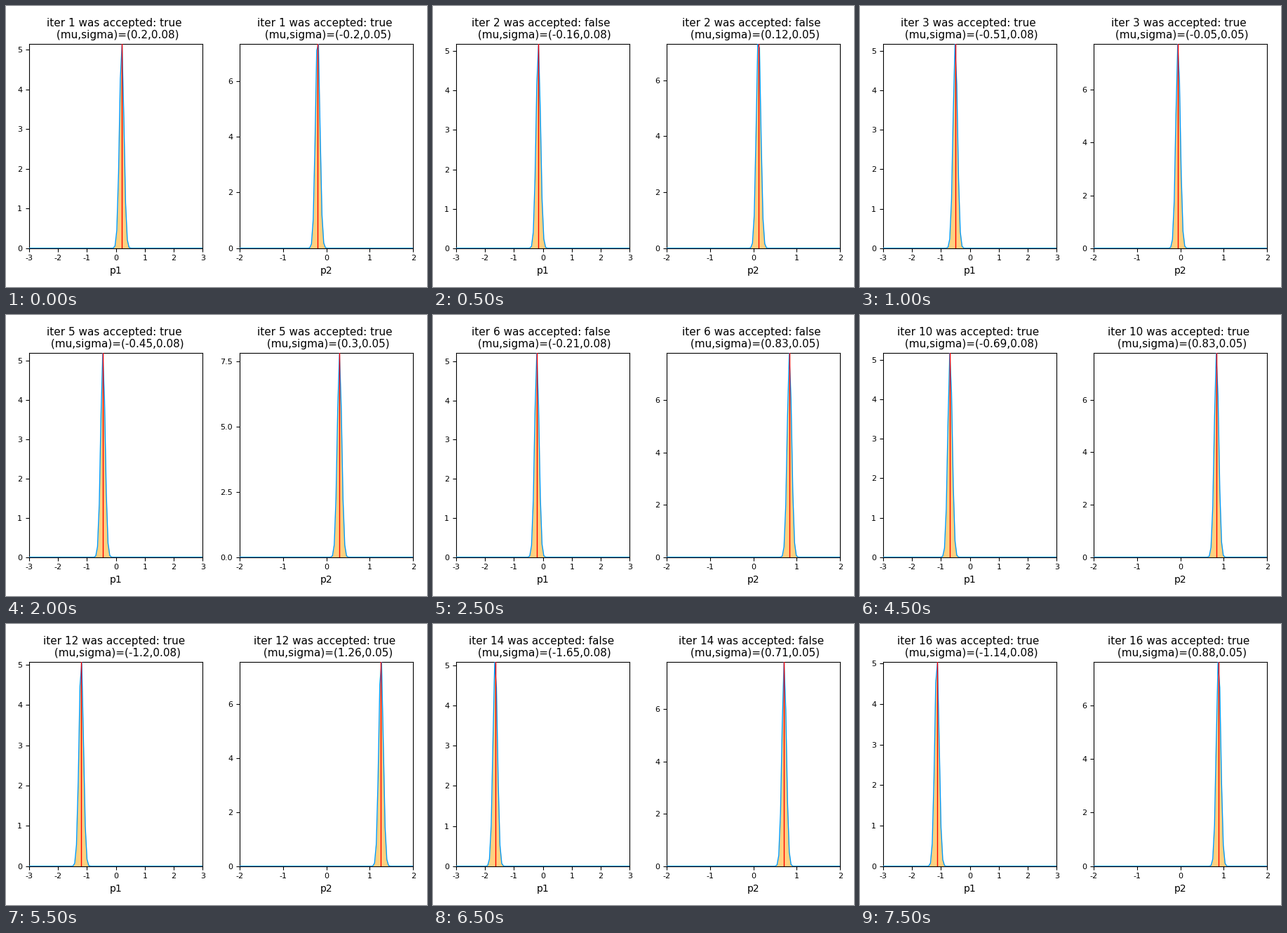
Recreate the animation shown at these times as a matplotlib script. Size 600 by 400 pixels, loop 8000 ms.

```python
import numpy as np
import matplotlib.pyplot as plt
from matplotlib.animation import FuncAnimation

W, H, DPI = 600, 400, 100
plt.rcParams["font.family"] = "DejaVu Sans"

BLUE, ORANGE, RED = "#009afa", "#ffa500", "#ff0000"

# One step of the chain: mean of p1, mean of p2, accepted
STEPS = [
    (0.2, -0.2, True), (-0.16, 0.12, False), (-0.506, -0.0534, True),
    (-0.38, 0.24, True), (-0.45, 0.303, True), (-0.2105, 0.832, False),
    (-0.33, 0.64, False), (-0.3532, 1.0792, False), (-0.56, 1.306, False),
    (-0.6876, 0.833, True), (-0.97, 1.838, True), (-1.2, 1.26, True),
    (-1.37, 0.58, False), (-1.6495, 0.71, False), (-1.36, 1.18, True),
    (-1.141, 0.8802, True),
]

fig = plt.figure(figsize=(W / DPI, H / DPI), dpi=DPI, facecolor="white")


def make_axes(left):
    return fig.add_axes([left / W, 55.25 / H, 247.3 / W, 290.5 / H])


# axes, label, half-width of the x range, sigma
PANELS = [
    (make_axes(33.0), "p1", 3, 0.0766),
    (make_axes(332.9), "p2", 2, 0.0511),
]


def y_ticks(top):
    if top < 6:
        return np.arange(6), "{:.0f}"
    if top < 7.8:
        return np.arange(0, 7, 2), "{:.0f}"
    return np.arange(0, 7.6, 2.5), "{:.1f}"


def draw_panel(panel, mu, head):
    ax, name, half, sigma = panel
    ax.clear()
    x = np.linspace(-half, half, 100)
    y = np.exp(-0.5 * ((x - mu) / sigma) ** 2) / (sigma * np.sqrt(2 * np.pi))
    top = y.max()
    ax.set_xlim(-half, half)
    ax.set_ylim(0, top)

    ax.fill_between(x, y, color=ORANGE, alpha=0.5, linewidth=0, zorder=1)
    ax.plot(x, y, color=BLUE, linewidth=1, zorder=4)
    ax.plot([mu, mu], [0, top], color=RED, linewidth=1, zorder=5)

    xt = range(-half, half + 1)
    ax.set_xticks(xt, [str(t) for t in xt])
    yt, fmt = y_ticks(top)
    yt = yt[yt <= top]
    ax.set_yticks(yt, [fmt.format(t) for t in yt])
    ax.tick_params(labelsize=8)
    ax.set_xlabel(name, fontsize=10)
    params = f"(mu,sigma)=({round(mu, 2)},{round(sigma, 2)})"
    ax.set_title(f"{head} \n {params}", fontsize=11)


def update(i):
    *means, accepted = STEPS[i]
    head = f"iter {i + 1} was accepted: {str(accepted).lower()}"
    for panel, mu in zip(PANELS, means):
        draw_panel(panel, mu, head)
    return []


anim = FuncAnimation(fig, update, frames=len(STEPS), interval=500,
                     init_func=lambda: update(0), repeat=True, repeat_delay=0)
plt.show()
```
